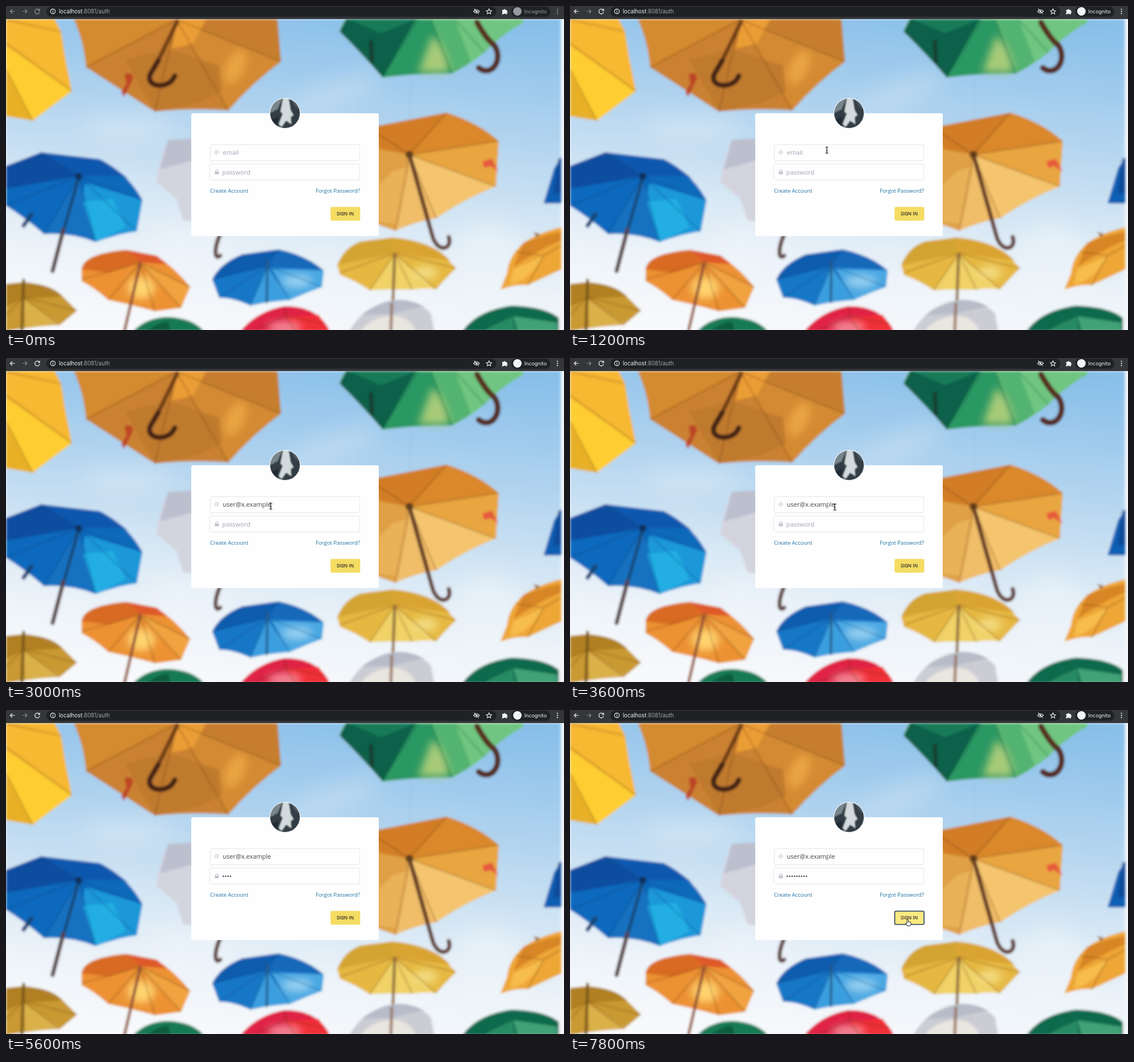
Animation, 982 px wide and 571 px high, one loop 8000 ms. Source, as an HTML page:

```html
<!DOCTYPE html>
<html lang="en">
<head>
<meta charset="utf-8">
<title>Sign in</title>
<style>
  html, body { margin: 0; width: 100%; height: 100%; overflow: hidden; background: #f4f6f9; }
  svg { display: block; width: 982px; height: 571px; }
  .form { font-family: "Open Sans", sans-serif; }
  .bar { font-family: Inter, sans-serif; }
  .field { fill: #fefefe; stroke: #e4e6ee; }
  .input { font-size: 11px; fill: #9fa1b4; }
  .input.filled { fill: #44454f; }
  .link { font-size: 9.5px; font-weight: 500; fill: #1d6fa5; }
  .ribs { fill: none; stroke: #5a2c08; stroke-width: 2.2; opacity: .32; }
  .pole { fill: none; stroke: #54291b; stroke-width: 7; stroke-linecap: round; }
  .icon { fill: none; stroke: currentColor; stroke-width: 1.2; }
</style>
</head>
<body>
<svg viewBox="0 0 982 571">
  <defs>
    <linearGradient id="sky" x1=".58" y1="0" x2=".42" y2="1">
      <stop offset="0" stop-color="#88bfe9"/>
      <stop offset=".33" stop-color="#b0d3ef"/>
      <stop offset=".62" stop-color="#d8e8f5"/>
      <stop offset=".82" stop-color="#eef4f9"/>
      <stop offset="1" stop-color="#f7f9fb"/>
    </linearGradient>
    <filter id="soft" x="0" y="0" width="982" height="580" filterUnits="userSpaceOnUse"><feGaussianBlur stdDeviation="2.1"/></filter>
    <filter id="haze" x="-60%" y="-100%" width="220%" height="300%"><feGaussianBlur stdDeviation="20"/></filter>
    <filter id="glow" x="-80%" y="-80%" width="260%" height="260%"><feGaussianBlur stdDeviation="7"/></filter>
    <filter id="fuzzy"><feGaussianBlur stdDeviation="1.3"/></filter>
    <clipPath id="photo"><rect y="23" width="976.500" height="550"/></clipPath>
    <clipPath id="round"><circle cx="491" cy="189" r="26"/></clipPath>
  </defs>

  <g filter="url(#soft)"><g clip-path="url(#photo)">
    <rect width="982" height="580" fill="url(#sky)"/>
    <g filter="url(#haze)" fill="#eff5fb">
      <ellipse cx="215" cy="215" rx="85" ry="22" opacity=".4"/>
      <ellipse cx="575" cy="158" rx="90" ry="16" transform="rotate(-22 575 158)" opacity=".4"/>
      <ellipse cx="320" cy="430" rx="80" ry="50" opacity=".55"/>
      <ellipse cx="850" cy="460" rx="70" ry="75" opacity=".6"/>
    </g>
    <path d="M713 125L710 250" stroke="#8da9c0" opacity=".5"/>

    <!-- yellow, top left -->
    <path d="M0 20H84L97 45L104 90L116 150L47 202L0 194Z" fill="#f7b832"/>
    <path d="M0 70L116 150L47 202L0 112Z" fill="#fdcd33"/>
    <path d="M0 118L47 202L0 194Z" fill="#e8b026"/>
    <path class="ribs" d="M0 24L97 45M0 66L116 150M0 112L47 202"/>

    <!-- brown, top -->
    <path d="M118 20H476L484 98Q434 135 391 184Q330 179 262 186Q200 146 141 108Q137 60 118 20Z" fill="#ca8130"/>
    <path d="M300 24L484 98Q434 135 391 184Z" fill="#d38a33"/>
    <path d="M300 24H478L484 98Z" fill="#c67e2e"/>
    <path d="M300 24L141 108Q137 60 118 20Z" fill="#d48a2f"/>
    <path d="M208 94L285 76L375 105L380 150L335 172L262 186Z" fill="#c07a2d"/>
    <path d="M302 24H352L329 66Q305 72 292 75Z" fill="#eb9d34"/>
    <ellipse cx="403" cy="108" rx="16" ry="32" transform="rotate(25 403 108)" fill="#e9a443" filter="url(#glow)"/>
    <path class="ribs" d="M300 24L141 108M300 24L262 186M300 24L391 184M300 24L484 98"/>
    <path class="pole" d="M301 28L268 96" style="stroke:#6b3812"/>
    <path class="pole" d="M268 96L254 120C244 144 288 148 297 123" style="stroke:#3f2112;stroke-width:9"/>
    <path d="M209 120Q222 115 224 127L208 160L203 152L212 136Z" fill="#bd4428"/>

    <!-- green, top -->
    <path d="M600 20H908L911 29Q875 48 842 82Q815 104 785 119Q720 118 663 126Q625 82 587 45Q590 33 600 20Z" fill="#70c680"/>
    <path d="M600 20H725L663 126Q625 82 587 45Z" fill="#0c6148"/>
    <path d="M721 24H748L785 119Q720 118 663 126Z" fill="#2b9862"/>
    <path d="M604 24H720L660 48Z" fill="#157a58"/>
    <path d="M748 24L785 119Q805 108 818 98L790 24Z" fill="#52b36f"/>
    <path d="M750 52Q778 75 780 117H726Z" fill="#a7ca78" filter="url(#glow)"/>
    <path class="ribs" d="M725 24L663 126M748 24L785 119M790 24L842 82" style="stroke:#064a33"/>
    <path class="pole" d="M642 63L644 98" style="stroke:#153e32"/>
    <path class="pole" d="M829 29Q844 57 860 70C876 97 853 126 832 109" style="stroke-width:10"/>

    <!-- blue, left -->
    <path d="M0 282L62 258L165 270Q215 295 240 342L230 397Q194 402 158 416Q112 398 67 402Q35 374 0 352Z" fill="#1069bd"/>
    <path d="M0 282L62 258L128 300L0 322Z" fill="#084e9f"/>
    <path d="M62 258L165 270Q190 284 210 300L128 300Z" fill="#0b58ae"/>
    <path d="M128 302L210 300L240 342L205 330Z" fill="#0f6abb"/>
    <path d="M140 312L240 342L230 397Q194 402 158 416L132 345Z" fill="#1b98d9"/>
    <path d="M128 302L67 402Q112 398 158 416Z" fill="#1571c0"/>
    <path d="M136 345L188 340L210 390Q185 402 158 416Z" fill="#20aee3"/>
    <path class="ribs" d="M128 300L62 258M128 300L0 352M128 300L67 402M128 300L158 416M128 300L230 397M128 300L240 342" style="stroke:#07326f"/>
    <path class="pole" d="M128 302L103 390" style="stroke:#12446f;stroke-width:5"/>
    <path class="pole" d="M101 394L82 467" style="stroke:#533c42"/>
    <path class="pole" d="M45 367L31 387" style="stroke:#194574"/>
    <circle cx="128" cy="300" r="6" fill="#082f55"/>

    <!-- grey, behind the card -->
    <path d="M285 236L335 233V380L312 378L300 340L264 310Q272 265 285 236Z" fill="#d4d4df"/>
    <path d="M285 236L335 233V270L271 288Z" fill="#bbbfce"/>

    <!-- orange, right -->
    <path d="M640 215L775 188Q832 206 867 238L862 318Q806 340 757 374Q720 380 685 396L640 380Z" fill="#e0a045"/>
    <path d="M650 212L775 188L710 262L656 252Z" fill="#d27d25"/>
    <path d="M775 188Q832 206 867 238L710 262Z" fill="#da8829"/>
    <path d="M710 262L867 238L862 318Z" fill="#e9a640"/>
    <path d="M710 262L862 318Q806 340 757 374Z" fill="#f4c56e"/>
    <path d="M710 262L757 374Q720 380 685 396Z" fill="#f0bd69"/>
    <path d="M680 292L711 281L690 385L656 380V315Z" fill="#e9b158"/>
    <path class="ribs" d="M710 262L775 188M710 262L867 238M710 262L862 318M710 262L757 374M710 262L685 396M710 262L650 222"/>
    <path class="pole" d="M710 262L749 400C757 438 787 430 779 407" style="stroke:#5b3024"/>
    <circle cx="710" cy="262" r="7" fill="#643c1b"/>
    <path d="M838 274L855 269L867 292L852 282L842 286Z" fill="#e65a3e"/>

    <path d="M980 264L965 285L946 348H980Z" fill="#0f5fb3"/>
    <path d="M972 270L980 264V330L963 330Z" fill="#094a99"/>
    <path class="pole" d="M377 402C364 432 368 448 377 440" style="stroke:#583731"/>

    <!-- orange, bottom left -->
    <path d="M133 464Q137 436 212 430L265 440Q300 464 324 495L308 532L262 538Q220 526 180 518Q155 496 133 485Z" fill="#ec9233"/>
    <path d="M133 464Q137 436 212 430L236 452L180 470Z" fill="#d96a22"/>
    <path d="M212 430L265 440L283 455L236 452Z" fill="#de5a2b"/>
    <path d="M236 452L324 495L308 532Z" fill="#f1a340"/>
    <ellipse cx="238" cy="496" rx="24" ry="20" fill="#ffd36f" filter="url(#glow)"/>
    <path class="ribs" d="M236 452L133 482M236 452L180 518M236 452L262 538M236 452L308 532M236 452L324 495"/>
    <path class="pole" d="M236 454L208 575" style="stroke:#915035;stroke-width:5"/>

    <!-- ochre, bottom left -->
    <path d="M0 490L30 487Q80 490 100 512L125 537L95 562Q50 564 0 573Z" fill="#c99a32"/>
    <path d="M0 490L30 487Q80 490 100 512L30 516L0 530Z" fill="#b08024"/>
    <path d="M30 516L98 560Q60 564 35 568Z" fill="#dab04a"/>
    <path class="ribs" d="M30 513L125 537M30 513L95 562M30 513L0 545"/>
    <path class="pole" d="M31 483L28 575" style="stroke:#77561f;stroke-width:5"/>

    <path d="M222 575Q245 549 285 548Q330 550 350 575Z" fill="#127a54"/>
    <path d="M245 575Q265 558 285 556L290 575Z" fill="#0b5b40"/>

    <!-- blue, bottom middle -->
    <path d="M363 482Q375 455 415 438L480 429Q530 440 559 466L556 495Q528 505 500 518Q465 520 430 528Q400 514 375 514Z" fill="#1877c7"/>
    <path d="M363 482Q375 455 415 438L480 429L460 458Z" fill="#0c5bae"/>
    <path d="M480 429Q530 440 559 466L460 458Z" fill="#1267b9"/>
    <path d="M468 463L559 466L556 495Q528 505 500 518Z" fill="#4aa8e2"/>
    <path d="M460 460L500 518Q465 520 430 528Z" fill="#3a9fdf"/>
    <ellipse cx="512" cy="485" rx="27" ry="11" fill="#98cff0" filter="url(#glow)"/>
    <path class="ribs" d="M460 458L363 482M460 458L375 514M460 458L430 528M460 458L500 518M460 458L556 495" style="stroke:#083f7a"/>
    <path class="pole" d="M460 448L459 522" style="stroke:#285a88;stroke-width:4"/>

    <!-- red, bottom middle -->
    <path d="M411 575Q440 538 490 529Q550 528 571 575Z" fill="#df2345"/>
    <path d="M492 548L550 544L571 575H505Z" fill="#f02d38"/>
    <ellipse cx="490" cy="566" rx="30" ry="10" fill="#f58b98" filter="url(#glow)"/>
    <path class="ribs" d="M492 546L430 575M492 546L510 575M492 546L560 560M492 546L490 529"/>

    <!-- yellow, bottom right -->
    <path d="M583 457Q595 425 625 415L680 408Q750 414 792 462Q772 482 757 499Q735 496 715 500Q675 498 640 501Q615 484 588 474Z" fill="#e6b842"/>
    <path d="M583 457Q595 425 625 415L680 408L684 436Z" fill="#d4a432"/>
    <path d="M680 408Q750 414 782 449L684 436Z" fill="#daa432"/>
    <path d="M684 438L757 499Q735 496 715 500Q675 498 640 501Z" fill="#f0d266"/>
    <ellipse cx="738" cy="470" rx="22" ry="12" fill="#f3dc80" filter="url(#glow)"/>
    <path class="ribs" d="M684 436L588 470M684 436L640 501M684 436L715 500M684 436L757 499M684 436L792 462"/>
    <path class="pole" d="M684 437L679 575" style="stroke:#8d6b3a;stroke-width:5"/>

    <!-- pale grey, bottom right -->
    <path d="M603 575Q625 535 660 525Q720 510 748 542L754 575Z" fill="#cccdd4"/>
    <path d="M622 575Q640 550 680 545Q712 548 722 575Z" fill="#e9e5df"/>
    <path d="M626 545Q680 500 735 529L680 542Z" fill="#b7bcc8"/>
    <path class="pole" d="M679 525L677 575" style="stroke:#987765;stroke-width:5"/>

    <!-- orange, right edge -->
    <path d="M980 389Q935 400 910 418Q884 442 882 470L870 500Q895 490 918 492L980 463Z" fill="#eea636"/>
    <path d="M910 418Q950 402 980 398V412Q940 427 893 460Z" fill="#d88526"/>
    <path d="M946 440L893 464L887 490Q920 486 946 440Z" fill="#f6bd4c"/>
    <path class="ribs" d="M897 433L946 440L980 421M946 440L918 492"/>
    <path d="M928 398L940 402L934 408Z" fill="#9a7154"/>

    <!-- green, bottom right -->
    <path d="M802 575Q827 537 890 528Q950 530 973 550V575Z" fill="#0d6b4e"/>
    <path d="M892 546L970 558V575H900Z" fill="#3fa276"/>
    <path d="M838 575Q860 558 892 547L896 575Z" fill="#268a63"/>
    <path class="ribs" d="M892 546L830 575M892 546L900 575M892 546L973 557" style="stroke:#06412e"/>
  </g></g>

  <g class="bar">
    <rect width="982" height="23" fill="#35363a"/>
    <rect x="71" y="1" width="792" height="18" rx="9" fill="#202124"/>
    <rect x="889" y="1" width="69" height="18" rx="9" fill="#202124"/>
    <g id="tools">
      <path class="icon" d="M15.500 9.500H7.500M11 6L7.500 9.500L11 13"/>
      <path class="icon" d="M29 9.500H37M33.500 6L37 9.500L33.500 13" style="stroke:#85878b"/>
      <path class="icon" d="M58.500 7.200A4.200 4.200 0 1 0 59.200 10.500M59.300 5V8H56.300"/>
      <g fill="currentColor">
        <circle cx="900" cy="9.500" r="7.500"/>
        <circle cx="970.500" cy="5.800" r="1.100"/><circle cx="970.500" cy="9.600" r="1.100"/><circle cx="970.500" cy="13.400" r="1.100"/>
        <text x="912" y="13" font-size="9">Incognito</text>
      </g>
    </g>
    <path d="M873 7H875.500A1.800 1.800 0 0 1 879 7H881.500V9.300A1.700 1.700 0 0 1 881.500 12.500V14.500H878.800A1.700 1.700 0 0 0 875.600 14.500H873V12A1.700 1.700 0 0 0 873 9Z" fill="#f1f3f4"/>
    <g color="#dfe1e5">
      <circle class="icon" cx="82.500" cy="9.500" r="4.200"/>
      <path class="icon" d="M82.500 9V12M82.500 6.800V8"/>
      <path class="icon" d="M823 9.500Q828 3.500 833 9.500Q828 15.500 823 9.500ZM824 5L832 14"/>
      <circle cx="828" cy="9.500" r="1.700" fill="currentColor"/>
      <path class="icon" d="M850 5L851.400 8.100L854.700 8.400L852.200 10.600L853 13.900L850 12.200L847 13.900L847.800 10.600L845.300 8.400L848.600 8.100Z"/>
    </g>
    <text x="93" y="13" font-size="9.700" fill="#f1f3f4">localhost<tspan fill="#a0a4a9">:8081/auth</tspan></text>
  </g>

  <g class="form">
    <rect x="326" y="189" width="330" height="216.500" rx="3" fill="#fefefe"/>
    <circle cx="491" cy="189" r="27.300" fill="#e9edf2"/>
    <g clip-path="url(#round)"><g filter="url(#fuzzy)">
      <rect x="460" y="158" width="62" height="62" fill="#323c44"/>
      <path d="M460 158H488L478 182L462 190Z" fill="#78858b"/>
      <path d="M499 158H522V184L509 178Z" fill="#4d5961"/>
      <path d="M488 160H497L501 184L506 192L501 196L502 208L493 202L485 213L480 208L487 190L483 186Z" fill="#d3dadd"/>
      <path d="M460 204L480 195L477 220H460Z" fill="#222b31"/>
    </g></g>
    <rect class="field" x="359.500" y="244.500" width="263" height="28" rx="2"/>
    <rect class="field" x="358.500" y="278.500" width="264" height="28" rx="2"/>
    <text x="366.700" y="261" font-size="9.500" fill="#b2b4c1">@</text>
    <path d="M367.500 292H374.500V296.500H367.500Z" fill="#c0c2cd"/>
    <path d="M369 292V290.500A2 2 0 0 1 373 290.500V292" fill="none" stroke="#c0c2cd" stroke-width="1.200"/>
    <text id="email" class="input" x="381.500" y="262"></text>
    <text id="password" class="input" x="380.500" y="297"></text>
    <g id="dots" fill="#44454f"></g>
    <path id="caret" d="M381.500 286V300" stroke="#333"/>
    <text class="link" x="359" y="329">Create Account</text>
    <text class="link" x="623" y="329" text-anchor="end">Forgot Password?</text>
    <rect id="button" x="571.500" y="354.500" width="51.500" height="23.500" rx="2"/>
    <text x="597" y="369" font-size="8.100" font-weight="600" text-anchor="middle" fill="#25262b">SIGN IN</text>
  </g>

  <g id="cursor">
    <path id="beam" d="M-2.500 -5.500Q0 -5.500 0 -4Q0 -5.500 2.500 -5.500M0 -4V4M-2.500 5.500Q0 5.500 0 4Q0 5.500 2.500 5.500M-1.500 1H1.500" fill="none" stroke="#222" stroke-width="1.200"/>
    <path id="arrow" d="M0 0V11L2.600 8.600L4.500 12.500L6.200 11.700L4.400 8H8Z" fill="#111" stroke="#fff" stroke-width=".8"/>
    <path id="hand" d="M-1.800 -4Q-.5 -6 .6 -4V-.5Q2 -1.500 2.800 0Q4.500 -.5 5 1.300V3.500L3.500 6.500H-1.500L-4.500 2Q-4 .3 -1.800 2Z" fill="#fff" stroke="#222"/>
  </g>
</svg>
<script>
const LOOP = 8000, STEP = 200;
const ADDRESS = "user@x.example";
const PASSWORD_LENGTH = 9;
// time, x, y of the pointer
const POINTER = [
  [800, 470, 242], [1200, 452, 254], [2200, 449, 257], [3000, 466, 261],
  [3800, 466, 263], [4400, 465, 295], [5000, 465, 295],
  [7000, 500, 325], [7400, 586, 371], [7600, 595, 374], [8000, 595, 374]
];
const $ = id => document.getElementById(id);
const show = (id, on) => $(id).setAttribute("visibility", on ? "visible" : "hidden");
const progress = (t, from, to) => Math.min(1, Math.max(0, (t - from) / (to - from)));

for (let i = 0; i < PASSWORD_LENGTH; i++) {
  const dot = document.createElementNS("http://www.w3.org/2000/svg", "circle");
  dot.setAttribute("cx", 382.5 + i * 4.2);
  dot.setAttribute("cy", 293);
  dot.setAttribute("r", 1.35);
  $("dots").append(dot);
}

function pointerAt(t) {
  const i = Math.max(1, POINTER.findIndex(p => p[0] > t));
  const [t0, x0, y0] = POINTER[i - 1], [t1, x1, y1] = POINTER[i];
  const k = progress(t, t0, t1), e = k * k * (3 - 2 * k);
  return [x0 + (x1 - x0) * e, y0 + (y1 - y0) * e];
}

function setInput(id, text, placeholder) {
  $(id).textContent = text || placeholder;
  $(id).classList.toggle("filled", !!text);
}

function draw(t) {
  $("tools").setAttribute("color", t < 600 ? "#96999e" : "#f1f3f4");

  const typed = Math.round(progress(t, 2400, 2900) * ADDRESS.length);
  setInput("email", ADDRESS.slice(0, typed), "email");

  const count = Math.round(progress(t, 4900, 6500) * PASSWORD_LENGTH);
  setInput("password", "", count ? "" : "password");
  [...$("dots").children].forEach((dot, i) => dot.setAttribute("opacity", i < count ? 1 : 0));
  show("caret", t >= 4400 && t < 5000);

  const [x, y] = pointerAt(t);
  const visible = (t >= 800 && t < 5000) || t >= 7000;
  const overButton = t >= 7000 && x > 571 && y > 354;
  const overField = x > 359 && x < 623 && ((y > 244 && y < 273) || (y > 278 && y < 307));
  $("cursor").setAttribute("transform", `translate(${x} ${y})`);
  show("hand", visible && overButton);
  show("beam", visible && overField);
  show("arrow", visible && !overButton && !overField);

  const focused = t >= 7600;
  $("button").setAttribute("fill", overButton ? "#fbe982" : "#f5dc62");
  $("button").setAttribute("stroke", focused ? "#22415c" : "#f0d866");
  $("button").setAttribute("stroke-width", focused ? 1.6 : .6);
}

const start = performance.now();
function tick() {
  const t = (performance.now() - start) % LOOP;
  draw(Math.floor(t / STEP) * STEP);
  requestAnimationFrame(tick);
}
tick();
</script>
</body>
</html>
```
